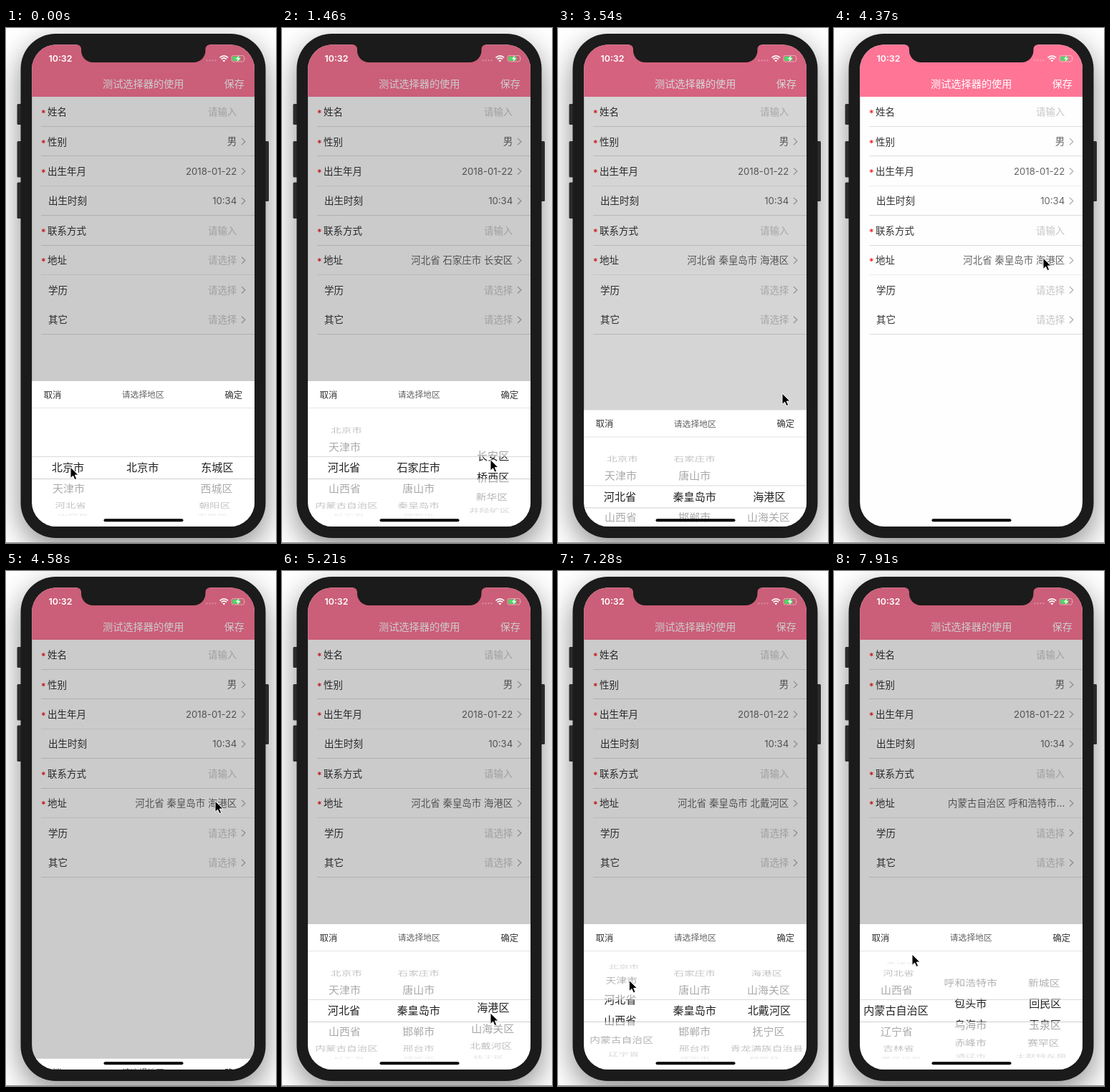
Animation, 377 px wide and 719 px high, one loop 8 s. Source, as an HTML page:

```html
<!DOCTYPE html>
<html lang="zh-CN">
<head>
<meta charset="utf-8">
<title>选择器</title>
<style>
html, body { margin: 0; width: 100%; height: 100%; overflow: hidden; background: #fff; }
svg { display: block; width: 377px; height: 719px; }
text { font-family: Inter, "Noto Sans CJK SC", "Noto Sans CJK", sans-serif; white-space: pre; }
</style>
</head>
<body>
<svg viewBox="0 0 377 719" xmlns="http://www.w3.org/2000/svg">
  <defs>
    <filter id="blur" x="-30%" y="-20%" width="160%" height="140%"><feGaussianBlur stdDeviation="20"/></filter>
    <clipPath id="screen"><rect x="36.2" y="23.2" width="310.8" height="672.8" rx="34"/></clipPath>
    <clipPath id="band"><rect x="36" y="598.5" width="311" height="31"/></clipPath>
    <clipPath id="rest"><path d="M36 531H347V598.5H36ZM36 629.5H347V697H36Z"/></clipPath>
  </defs>
  <rect x="20" y="22" width="343" height="704" rx="50" fill="#000" opacity=".45" filter="url(#blur)"/>
  <rect y="718" width="377" height="1" fill="#8c8c8c"/>
  <g fill="#2b2b2b">
    <rect x="15.5" y="106" width="8" height="29" rx="1.5"/>
    <rect x="15.5" y="158" width="8" height="50.5" rx="1.5"/>
    <rect x="15.5" y="215.5" width="8" height="50.5" rx="1.5"/>
    <rect x="359" y="158" width="8" height="84" rx="1.5"/>
  </g>
  <rect x="20.5" y="8" width="342" height="704" rx="49" fill="#1b1b1b"/>
  <g clip-path="url(#screen)">
    <rect x="36" y="23" width="312" height="674" fill="#fefefe"/>
    <rect x="36" y="23" width="312" height="73" fill="#fe7596"/>
    <g id="form"></g>
    <rect id="shade" x="36" y="23" width="312" height="674"/>
    <g id="status"></g>
    <g id="sheet"></g>
    <rect x="136.5" y="685.2" width="111" height="4" rx="2" fill="#000"/>
  </g>
  <path d="M99 22.5V23.2A6 6 0 0 1 105 29.2V31.5A16.5 16.5 0 0 0 121.5 48H262A16.5 16.5 0 0 0 278.500 31.5V29.2A6 6 0 0 1 284.5 23.2V22.5Z" fill="#1b1b1b"/>
  <path id="cursor" d="M0 0V15.5L3.6 12.2L6 17.6L8.7 16.4L6.3 11.1H11Z" fill="#000" stroke="#fff"/>
</svg>
<script>
const $ = id => document.getElementById(id);
const STEP = 208, LOOP = 8000; // the picture advances in whole steps

const PROVINCES = '北京市 天津市 河北省 山西省 内蒙古自治区 辽宁省 吉林省 黑龙江省';
const HEBEI = '石家庄市 唐山市 秦皇岛市 邯郸市 邢台市 保定市';
// [first step, cities, districts]
const LISTS = [
  [0, '北京市', '东城区 西城区 朝阳区 丰台区'],
  [4, HEBEI, '长安区 桥西区 新华区 井陉矿区 裕华区'],
  [12, HEBEI, '海港区 山海关区 北戴河区 抚宁区 青龙满族自治县 昌黎县'],
  [38, '呼和浩特市 包头市 乌海市 赤峰市 通辽市', '新城区 回民区 玉泉区 赛罕区 土默特左旗']
];
// [first step, text]
const ADDRESS = [
  [0, ''], [4, '河北省 石家庄市 长安区'], [9, '河北省 石家庄市 桥西区'],
  [12, '河北省 秦皇岛市 海港区'], [30, '河北省 秦皇岛市 北戴河区'],
  [38, '内蒙古自治区 呼和浩特市…']
];
// Pointer moves: [start step, end step, x, y]
const MOVES = [
  [0, 3, 93, 558], [4, 6, 291, 617], [6, 8, 291, 588], [8, 9, 198, 620], [9, 11, 197, 565],
  [12, 16, 313, 510], [18, 21, 292, 321], [22, 25, 291, 617], [25, 29, 292, 572],
  [29, 31, 96, 584], [34, 37, 109, 535]
];

const latest = (list, k) => list.filter(e => e[0] <= k).pop();

function ease(k, from, to) {
  const p = Math.min(1, Math.max(0, (k - from) / (to - from)));
  return p * p * (3 - 2 * p);
}

const pointer = k => MOVES.reduce(([x, y], [from, to, tx, ty]) => {
  const p = ease(k, from, to);
  return [x + (tx - x) * p, y + (ty - y) * p];
}, [90, 613]);

// Row position of each wheel; the last two rewind when their list changes
function positions(k) {
  const rewind = 2 * ease(k, 37, 39.6);
  return [
    2 * ease(k, 0, 3) + 2 * ease(k, 34, 37),
    2 * ease(k, 9, 11) - rewind,
    ease(k, 6, 7.9) - ease(k, 11, 13) + 2 * ease(k, 24, 30) - rewind
  ];
}

const text = (s, x, y, size, fill, anchor = 'start', extra = '') =>
  `<text x="${x}" y="${y + size * .375}" font-size="${size}" fill="${fill}" text-anchor="${anchor}" ${extra}>${s}</text>`;
const line = (x, y, color) => `<rect x="${x}" y="${y}" width="${347 - x}" height="1" fill="${color}"/>`;

function form(address) {
  // label, required, value, placeholder, chevron
  const rows = [
    ['姓名', 1, '', '请输入', 0], ['性别', 1, '男', '', 1], ['出生年月', 1, '2018-01-22', '', 1],
    ['出生时刻', 0, '10:34', '', 1], ['联系方式', 1, '', '请输入', 0], ['地址', 1, address, '请选择', 1],
    ['学历', 0, '', '请选择', 1], ['其它', 0, '', '请选择', 1]
  ];
  return text('测试选择器的使用', 191.7, 78, 14.2, '#fff', 'middle') +
    text('保存', 333, 78, 14.2, '#fff', 'end') +
    rows.map(([label, must, value, hint, more], i) => {
      const y = 117 + i * 41.44;
      const size = /^\d/.test(value) ? 13.2 : 13.45;
      return (must ? text('*', 49, y + 2.3, 13, '#f00000') : '') +
        text(label, must ? 58 : 59, y, 13.5, '#333') +
        text(value || hint, 322.3, y, size, value ? '#666' : '#c6c6c6', 'end') +
        (more ? `<path d="M329 ${y - 4.5}l4.8 4.7l-4.8 4.7" fill="none" stroke="#aaa" stroke-width="1.2"/>` : '') +
        (i === 6 ? '' : line(49, Math.round(y + 20), i % 3 === 2 ? '#ebebeb' : '#dcdcdc'));
    }).join('');
}

function status() {
  const dots = [0, 1, 2, 3].map(i => `<circle cx="${280.5 + i * 4}" cy="45.3" r="1.1"/>`).join('');
  return text('10:32', 59.5, 42.5, 12.4, '#fff', 'start', 'font-weight="600"') +
    `<g fill="#fff" opacity=".35">${dots}</g>
    <path d="M298.5 41.3Q304.3 36.3 310.1 41.3M300.6 43.6Q304.3 40.3 308 43.6" fill="none" stroke="#fff" stroke-width="1.7"/>
    <path d="M302.3 45.2Q304.3 43.6 306.3 45.2L304.3 47.4Z" fill="#fff"/>
    <rect x="315" y="38.5" width="17.5" height="8.5" rx="2.3" fill="none" stroke="#fff" stroke-opacity=".5" stroke-width=".9"/>
    <rect x="316.3" y="39.8" width="11" height="5.9" rx="1.2" fill="#4cd964"/>
    <path d="M333.7 41.2q1.3 1.5 0 3Z" fill="#fff" opacity=".5"/>
    <path d="M325.3 38.3L320.8 43.3H323.6L322.6 47.2L327.2 42.1H324.3Z" fill="#fff"/>`;
}

// Rows lie on a cylinder seen in perspective
function wheel(items, pos, cx, inner) {
  return items.map((name, i) => {
    const a = (i - pos) * .438, c = Math.cos(a);
    if (Math.abs(a) > 1.5) return '';
    const s = 700 / (700 + 68.4 * (1 - c));
    const x = 191.5 + (cx - 191.5) * s, y = 613.6 + 68.4 * Math.sin(a);
    return `<g transform="translate(${x} ${y}) scale(${s} ${s * c})" opacity="${inner ? 1 : .8 * c}">` +
      text(name, 0, 0, 15.1, inner ? '#222' : '#888', 'middle') + '</g>';
  }).join('');
}

function sheet(k) {
  const [, cities, areas] = latest(LISTS, k);
  const columns = [PROVINCES, cities, areas], pos = positions(k);
  const draw = inner => columns.map((names, i) =>
    wheel(names.split(' '), pos[i], 86.5 + i * 104.2, inner)).join('');
  return '<rect x="36" y="493" width="312" height="205" fill="#fff"/>' +
    text('取消', 52.8, 512, 12.3, '#333') +
    text('请选择地区', 191.3, 512, 11.8, '#666', 'middle') +
    text('确定', 330, 512, 12.3, '#333', 'end') +
    line(36, 530, '#e4e4e4') + line(36, 598, '#dadada') + line(36, 629, '#d0d0d0') +
    `<g clip-path="url(#rest)">${draw(false)}</g><g clip-path="url(#band)">${draw(true)}</g>`;
}

let shown = -1;
function render(ms) {
  const k = Math.floor((ms % LOOP) / STEP);
  if (k === shown) return;
  shown = k;
  const closed = ease(k, 16.7, 17.75), opened = ease(k, 21.8, 22.96);
  const [x, y] = pointer(k);
  $('form').innerHTML = form(latest(ADDRESS, k)[1]);
  $('sheet').innerHTML = sheet(k);
  $('sheet').setAttribute('transform', `translate(0 ${204 * (closed - opened)})`);
  $('shade').setAttribute('opacity', opened ? .2 : .2 * (1 - closed));
  $('cursor').setAttribute('transform', `translate(${x} ${y})`);
}

$('status').innerHTML = status();
const start = performance.now();
function tick() {
  render(performance.now() - start);
  requestAnimationFrame(tick);
}
tick();
</script>
</body>
</html>
```
